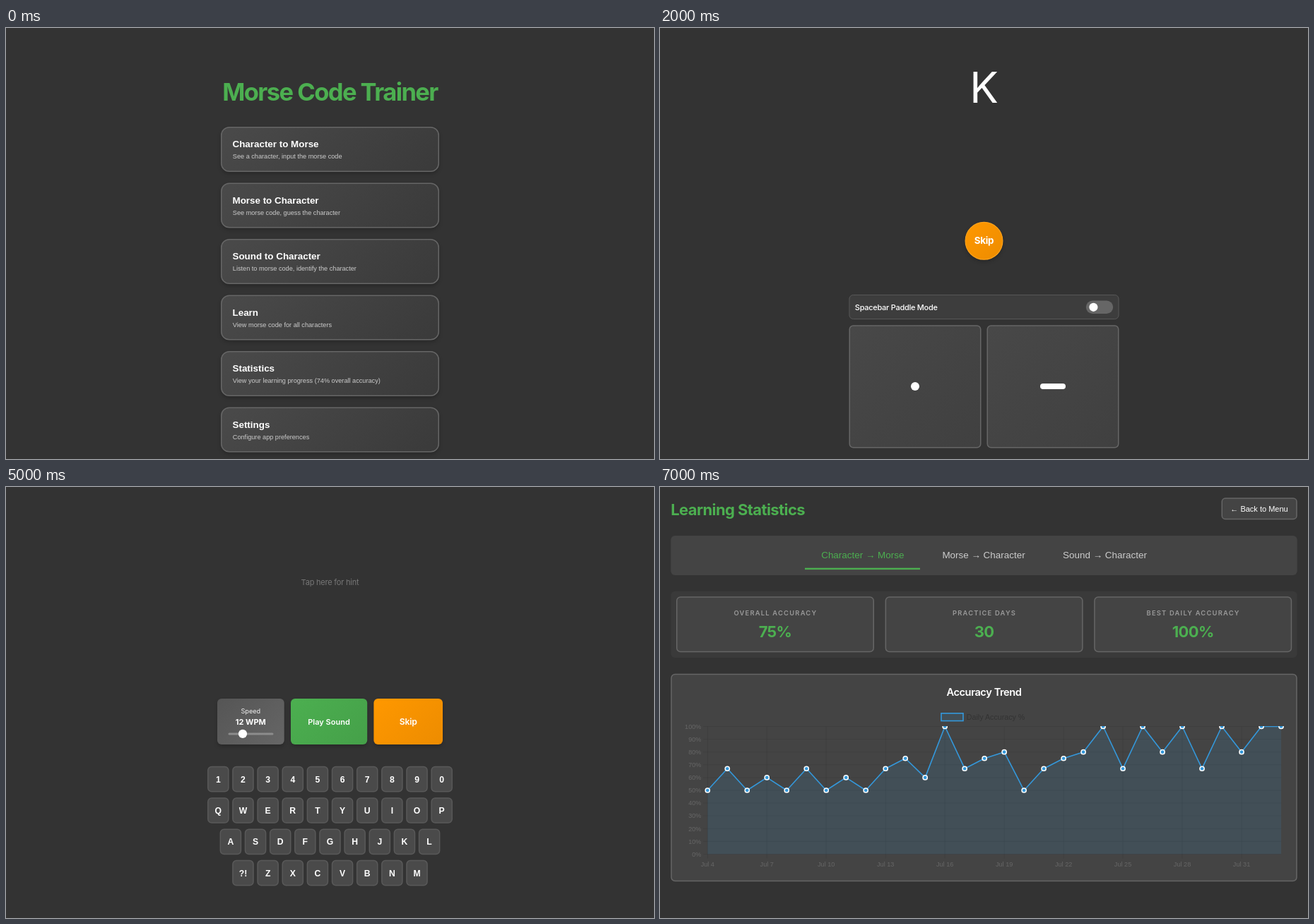
Write an HTML page that moves like this. It is 917 px wide and 611 px high and loops after 8000 ms.

```html
<!DOCTYPE html>
<html lang="en">
<head>
<meta charset="utf-8">
<title>Morse Code Trainer</title>
<style>
  html, body { margin: 0; width: 100%; height: 100%; overflow: hidden; background: #333; }
  svg { display: block; width: 100%; height: 100%; }
  text { font-family: Inter, sans-serif; font-optical-sizing: none; white-space: pre; }
  .arial { font-family: "Liberation Sans", Arial, sans-serif; }
  .mid { text-anchor: middle; }
  .end { text-anchor: end; }
  .medium { font-weight: 500; }
  .semi { font-weight: 600; }
  .bold { font-weight: 700; }
  .shadow { filter: drop-shadow(0 3px 2.5px rgba(0, 0, 0, .2)); }
</style>
</head>
<body>
<svg id="stage" viewBox="0 0 917 611"></svg>
<script>
const GREEN = '#4caf50', BLUE = '#3498db', MID = 458.5;
const ORANGE = ['#ff9800', '#ed8c00'], PANEL = ['#4a4a4a', '#3a3a3a'];
let gradientCount = 0;

// Text on a baseline; spacing is in em.
const text = (x, y, str, size, fill = '#fff', cls = '', spacing = 0) =>
  `<text x="${x}" y="${y}" class="${cls}" font-size="${size}" fill="${fill}" letter-spacing="${(spacing * size).toFixed(3)}">${str.replace(/</g, '&lt;')}</text>`;

// Box from outer edges; an array as fill makes a 135 degree gradient.
function box(x1, y1, x2, y2, r, fill, stroke = 'none', line = 0, cls = '') {
  const w = x2 - x1, h = y2 - y1;
  let defs = '';
  if (Array.isArray(fill)) {
    const id = 'g' + gradientCount++, cx = x1 + w / 2, cy = y1 + h / 2, d = (w + h) / 4;
    defs = `<linearGradient id="${id}" gradientUnits="userSpaceOnUse" x1="${cx - d}" y1="${cy - d}" x2="${cx + d}" y2="${cy + d}">
      <stop stop-color="${fill[0]}"/><stop offset="1" stop-color="${fill[1]}"/></linearGradient>`;
    fill = `url(#${id})`;
  }
  return `${defs}<rect x="${x1 + line / 2}" y="${y1 + line / 2}" width="${w - line}" height="${h - line}"
    rx="${Math.max(0, r - line / 2)}" fill="${fill}" stroke="${stroke}" stroke-width="${line}" class="${cls}"/>`;
}

const circle = (x, y, r, fill, extra = '') => `<circle cx="${x}" cy="${y}" r="${r}" fill="${fill}" ${extra}/>`;
const path = (d, stroke, width, fill = 'none') =>
  `<path d="${d}" fill="${fill}" stroke="${stroke}" stroke-width="${width}" stroke-linejoin="round"/>`;

const morse = (cx, y, code, scale = 1) => [...code].map((mark, i) => {
  const x = cx - .5 + (i - (code.length - 1) / 2) * 12.8 * scale;
  return mark === '-'
    ? box(x - 4 * scale, y - .7 * scale, x + 4 * scale, y + .7 * scale, 0, '#fff')
    : circle(x, y + 4.3 * scale, 1.3 * scale, '#fff');
}).join('');

function menu() {
  const items = [
    ['Character to Morse', 'See a character, input the morse code'],
    ['Morse to Character', 'See morse code, guess the character'],
    ['Sound to Character', 'Listen to morse code, identify the character'],
    ['Learn', 'View morse code for all characters'],
    ['Statistics', 'View your learning progress (74% overall accuracy)'],
    ['Settings', 'Configure app preferences']
  ];
  return text(MID, 103, 'Morse Code Trainer', 34.5, GREEN, 'mid bold', -.045) +
    items.map(([title, note], i) => {
      const y = 140 + i * 79.5;
      return box(304, y, 613, y + 64, 12, PANEL, '#666', 1.5, 'shadow') +
        text(320.5, y + 29, title, 13.4, '#fff', 'arial bold') +
        text(320.8, y + 45, note, 9.17, '#ccc', 'arial');
    }).join('');
}

function settings() {
  const label = (x, y, str, fill) => text(x, y, str, 13.45, fill, '', -.03);
  const note = (y, str) => text(282.8, y, str, 11, '#aaa', '', -.02);
  const checkbox = y => box(285.8, y, 301, y + 15.2, 2, GREEN) +
    path(`M289 ${y + 8}l3.2 3.3 5.8 -8`, '#333', 2);
  return menu() + box(0, 0, 917, 611, 0, 'rgba(0,0,0,.5)') +
    box(267.5, 64, 649.5, 547, 6, '#444') +
    text(282.8, 100, 'Settings', 18.3, GREEN, 'bold', -.03) +
    text(625, 99.5, '×', 18, '#e0e0e0', 'arial mid') +
    box(267.5, 123, 649.5, 124, 0, '#555') +
    checkbox(141.5) + label(310.6, 154.3, 'Include Punctuation') +
    note(179, 'Include punctuation marks in practice modes') +
    label(282.6, 223, 'Morse Code Speed', '#999') +
    box(563.5, 205, 634.5, 231, 4.5, 'rgba(76,175,80,.2)', 'rgba(76,175,80,.4)', .8) +
    text(599, 223, '12 WPM', 13.45, GREEN, 'mid medium', -.025) +
    box(282.8, 250.3, 634.5, 254.9, 2.3, '#333') + circle(384.2, 252.5, 7.6, GREEN) +
    note(282, 'Adjust the speed of morse code playback (5-30 WPM)') +
    checkbox(310.7) + label(310.6, 324, 'Show Accuracy Toast') +
    note(347.5, 'Display a toast notification with accuracy periodically.') +
    label(282.6, 390.3, 'Show accuracy every') +
    box(417.3, 374, 463, 397.3, 3, '#333', '#666', .9) +
    text(440, 390.3, '20', 13.45, '#fff', 'arial mid') +
    label(469.3, 390.3, 'questions') +
    note(417, 'Shows your accuracy over the most recent questions when') +
    note(432.3, 'practicing.') +
    box(282.8, 458.3, 634.5, 486.3, 6, '#f44336') +
    text(MID, 476, 'Clear All Statistics', 11, '#fff', 'arial mid') +
    note(506, 'Reset all practice session data and accuracy tracking');
}

function keying(character, paddle) {
  const head = text(MID, 106, character, 60.5, '#fff', 'mid') +
    box(431.5, 274.8, 485.5, 328.8, 27, ORANGE, '#ffa31a', 1.2, 'shadow') +
    text(MID, 306.3, 'Skip', 13.45, '#fff', 'mid bold', -.02) +
    box(267.5, 378, 649.5, 413, 6, '#3d3d3d', '#5c5c5c', .9) +
    text(275.8, 400.4, 'Spacebar Paddle Mode', 11, '#fff', 'medium', -.025) +
    box(602.8, 386.6, 641.2, 405, 9.2, paddle ? GREEN : '#666') +
    circle(paddle ? 630.6 : 613.4, 395.8, 6.1, '#fff');
  if (!paddle) return head +
    box(267.5, 421.3, 454.5, 595.5, 6, ['#484848', '#404040'], '#666', 1.5) + circle(361, 508, 6, '#fff') +
    box(462.5, 421.3, 649.5, 595.5, 6, ['#484848', '#404040'], '#666', 1.5) + box(538, 504, 574, 512, 4, '#fff');
  return head +
    box(267.5, 421.3, 649.5, 496.3, 6, '#3d3d3d', '#5c5c5c', .9) +
    text(MID, 443.4, 'Paddle Speed', 9.8, '#999', 'mid', -.01) +
    text(MID, 459.7, '12 WPM', 12.2, GREEN, 'mid semi', -.015) +
    box(281, 476.9, 638.5, 481.6, 2.4, '#efefef', '#b8b8b8', .7) +
    box(281, 476.9, 385, 481.6, 2.4, '#0075ff') + circle(384.4, 479.2, 6.1, '#0075ff') +
    box(267.5, 504.3, 649.5, 595.7, 6, ['#484848', '#404040'], '#666', 1.5) +
    path('M285.3 532.5v2.8h10.2v-2.8', GREEN, 1.2) +
    text(304, 534.8, 'Press spacebar or click/tap this area', 11.2, '#fff', 'semi', -.012) +
    box(284.3, 547.3, 458.5, 565.5, 3, 'rgba(76,175,80,.3)', 'rgba(76,175,80,.5)', .8) +
    text(371.3, 559.8, 'DOT (<120ms)', 8.56, GREEN, 'mid semi', .062) +
    box(458.5, 547.3, 632.7, 565.5, 3, 'rgba(255,179,0,.3)', 'rgba(255,179,0,.7)', .8) +
    text(545.6, 559.8, 'DASH (96-360ms)', 8.56, '#ffb300', 'mid semi', .065) +
    box(284.3, 572.8, 632.7, 579.3, 3, '#333', '#666', .9);
}

const keyboard = () => ['1234567890', 'QWERTYUIOP', 'ASDFGHJKL', '?ZXCVBNM'].map((row, r) =>
  [...row].map((key, i) => {
    const x = MID + (i - (row.length - 1) / 2) * 35.15, y = 395.8 + r * 44.35;
    return box(x - 15.3, y, x + 15.3, y + 36.7, 6, '#4a4a4a', '#595959', 1.5) +
      text(x, y + 22.8, key === '?' ? '?!' : key, 12.2, '#fff', 'arial bold mid');
  }).join('')).join('');

const readMorse = () => morse(MID, 136, '-.-', 2) +
  box(409.7, 300, 507.3, 365, 6, ORANGE, 'none', 0, 'shadow') +
  text(MID, 337.4, 'Skip', 12.2, '#fff', 'mid semi', -.02) + keyboard();

const listen = () => text(MID, 139, 'Tap here for hint', 11, '#777', 'mid', -.02) +
  box(299, 300, 393.7, 365, 6, ['#555', '#666'], 'none', 0, 'shadow') +
  text(346.3, 321.4, 'Speed', 9.17, '#eee', 'mid') +
  text(346.3, 336.8, '12 WPM', 11, '#fff', 'mid bold') +
  box(314.5, 348.4, 378.5, 351.5, 1.5, '#8c8c8c') + circle(335, 349.9, 6.1, '#fff') +
  box(403, 300, 511.2, 365, 6, [GREEN, '#45a049'], 'none', 0, 'shadow') +
  text(457, 336.9, 'Play Sound', 11, '#fff', 'mid semi') +
  box(520.4, 300, 618, 365, 6, ORANGE, 'none', 0, 'shadow') +
  text(569.2, 337.4, 'Skip', 12.2, '#fff', 'mid semi', -.02) + keyboard();

function learn() {
  const codes = '.- -... -.-. -.. . ..-. --. .... .. .--- -.- .-.. -- -. --- .--. --.- .-.'.split(' ');
  return box(168, 55.6, 749, 57.1, 0, '#555') + box(317, 53.4, 404, 55.7, 0, GREEN) +
    text(360.2, 39, 'Letters', 13.45, GREEN, 'arial mid') +
    text(443.5, 39, 'Digits', 13.45, '#ccc', 'arial mid') +
    text(541.5, 39, 'Punctuation', 13.45, '#ccc', 'arial mid') +
    codes.map((code, i) => {
      const x = 168 + i % 3 * 197.4, y = 95.4 + Math.floor(i / 3) * 102.35;
      return box(x, y, x + 186.2, y + 91, 6, '#444') +
        text(x + 93.1, y + 41, String.fromCharCode(65 + i), 24.4, GREEN, 'bold mid') +
        morse(x + 93.1, y + 63.4, code);
    }).join('');
}

function chart() {
  const values = [50, 67, 50, 60, 50, 67, 50, 60, 50, 67, 75, 60, 100, 67, 75,
    80, 50, 67, 75, 80, 100, 67, 100, 80, 100, 67, 100, 80, 100, 100];
  const px = i => 67.3 + i * 27.99, py = v => 520.5 - v * 1.81;
  const line = 'M' + values.map((v, i) => `${px(i).toFixed(1)} ${py(v).toFixed(1)}`).join('L');
  let out = '';
  for (let v = 0; v <= 100; v += 10)
    out += path(`M61 ${py(v)}H${px(29)}`, 'rgba(0,0,0,.1)', .8) +
      text(58.5, py(v) + 3.2, v + '%', 9.17, '#666', 'arial end');
  for (let i = 0; i < 30; i += 3)
    out += path(`M${px(i)} 339.5V526.5`, 'rgba(0,0,0,.1)', .8) +
      text(px(i), 538, 'Jul ' + (4 + i), 9.17, '#666', 'arial mid');
  return out + `<clipPath id="plot"><rect x="60" y="339" width="827" height="190"/></clipPath><g clip-path="url(#plot)">` +
    path(`${line}V520.5H${px(0)}Z`, 'none', 0, 'rgba(52,152,219,.12)') + path(line, BLUE, 1.6) +
    values.map((v, i) => circle(px(i), py(v), 3.1, BLUE, 'stroke="#fff" stroke-width="1.5"')).join('') + '</g>';
}

function statistics() {
  const tabs = [[286.8, 'Character → Morse'], [458, 'Morse → Character'], [629.5, 'Sound → Character']];
  const totals = [['OVERALL ACCURACY', '75%'], ['PRACTICE DAYS', '30'], ['BEST DAILY ACCURACY', '100%']];
  return text(15.2, 39.7, 'Learning Statistics', 22, GREEN, 'bold', -.027) +
    box(794.5, 15.3, 901.7, 46.2, 5.5, '#444', '#666', 1.5) +
    text(848, 34.6, '← Back to Menu', 11, '#fff', 'arial mid') +
    box(15.3, 69, 901.7, 125, 6, '#444') +
    tabs.map(([x, label], i) => text(x, 101, label, 13.45, i ? '#ccc' : GREEN, 'arial mid')).join('') +
    box(205, 114.7, 368, 117.1, 0, GREEN) +
    box(15.3, 147.7, 901.7, 242, 6, '#3a3a3a') +
    totals.map(([label, value], i) => {
      const x = 23 + i * 295.6;
      return box(x, 155.3, x + 280, 234.3, 6, '#444', '#666', 1.5) +
        text(x + 140.4, 181.6, label, 9.4, '#999', 'mid semi', .128) +
        text(x + 140, 213.2, value, 22, GREEN, 'mid bold', -.03);
    }).join('') +
    box(15.3, 264.8, 901.7, 559.3, 6, '#444', '#666', 1.5) +
    text(MID, 295.6, 'Accuracy Trend', 14.67, '#fff', 'mid semi', -.03) +
    box(397.2, 320, 429.8, 332.3, 0, 'rgba(52,152,219,.12)', BLUE, 1.6) +
    text(433.8, 329.6, 'Daily Accuracy %', 10.7, '#333', 'arial') + chart();
}

const scenes = [menu(), settings(), keying('K', false), keying('2', true),
  readMorse(), listen(), learn(), statistics()];
const stage = document.getElementById('stage');
stage.innerHTML = scenes.map(scene => `<g visibility="hidden">${scene}</g>`).join('');
const groups = [...stage.children];

function draw() {
  const current = Math.floor(performance.now() / 1000) % groups.length;
  groups.forEach((group, i) => group.setAttribute('visibility', i === current ? 'visible' : 'hidden'));
  requestAnimationFrame(draw);
}
draw();
</script>
</body>
</html>
```
